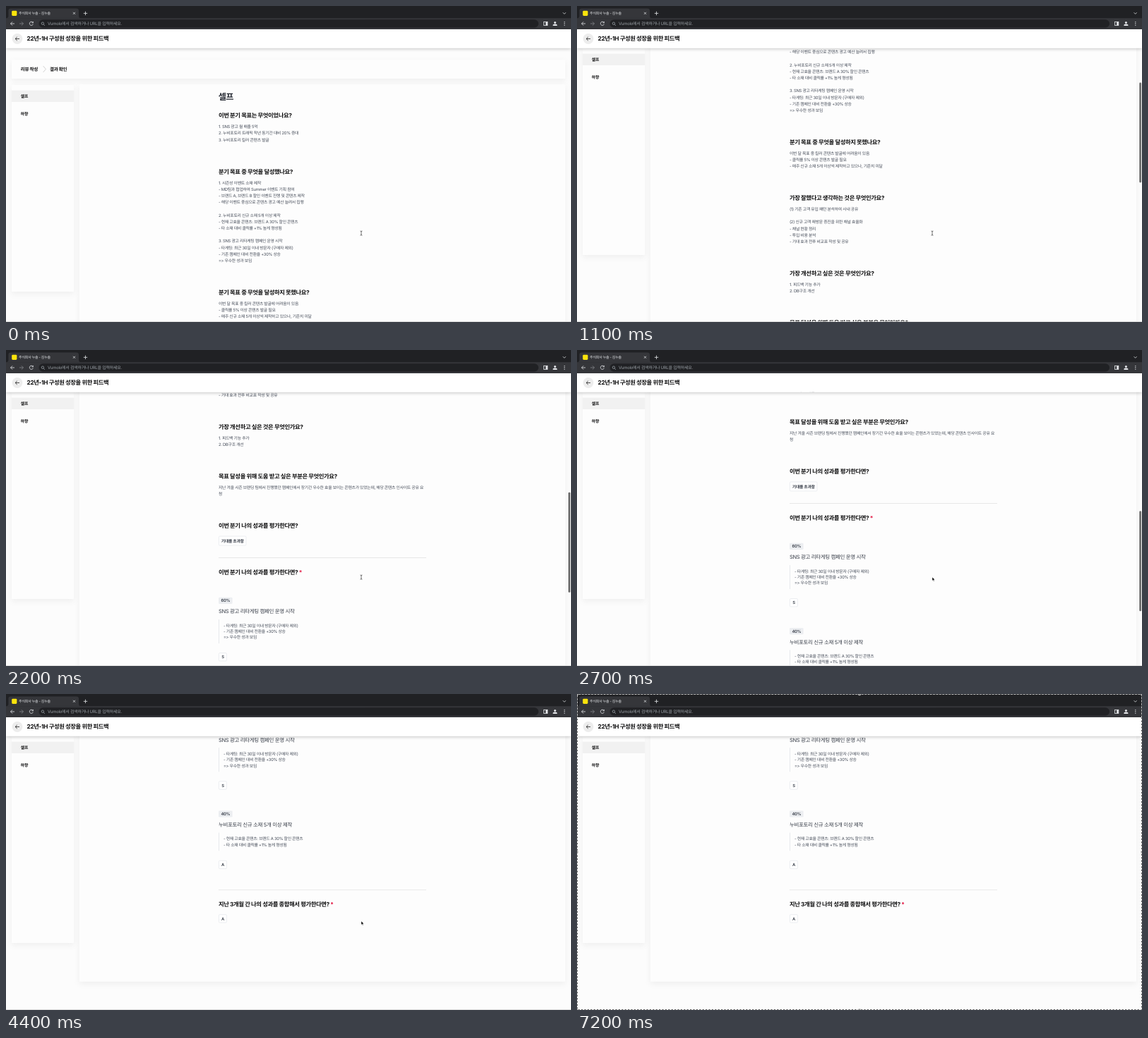
Write an HTML page that moves like this. It is 800 px wide and 448 px high and loops after 7300 ms.

```html
<!DOCTYPE html>
<html lang="ko">
<head>
<meta charset="utf-8">
<title>피드백</title>
<style>
  html, body { margin: 0; width: 100%; height: 100%; overflow: hidden; background: #fcfcfc; }
  svg { display: block; width: 100vw; height: 100vh; }
  text {
    font-family: Inter, "Noto Sans CJK KR", "Noto Sans CJK", sans-serif;
    letter-spacing: -.045em;
    text-rendering: geometricPrecision;
    white-space: pre;
  }
</style>
</head>
<body>
<svg id="stage" viewBox="0 0 800 448" lang="ko">
  <defs>
    <filter id="soft" x="-20%" y="-20%" width="140%" height="150%">
      <feDropShadow dx="0" dy="3" stdDeviation="4" flood-color="#000" flood-opacity=".055"/>
    </filter>
    <filter id="bar" x="-5%" y="-20%" width="110%" height="180%">
      <feDropShadow dx="0" dy="1.5" stdDeviation="2.2" flood-color="#000" flood-opacity=".2"/>
    </filter>
  </defs>
  <rect width="800" height="448" fill="#fcfcfc"/>
  <g id="page">
    <rect x="8" y="76" width="784" height="27" rx="1.5" fill="#fdfdfd" filter="url(#soft)"/>
    <path d="M52.6 85l3.8 4.5-3.8 4.5" fill="none" stroke="#b5b5b5" stroke-width=".6"/>
    <rect x="104" y="111" width="688" height="1086" rx="1.5" fill="#fdfdfd" filter="url(#soft)"/>
    <g id="content"></g>
    <g id="side">
      <rect x="8" y="112" width="88" height="293" rx="1.5" fill="#fdfdfd" filter="url(#soft)"/>
      <rect x="8" y="119.6" width="88" height="16.4" fill="#f1f1f1"/>
    </g>
  </g>
  <rect y="447" width="800" height="1" fill="#d8d8d8"/>
  <rect id="thumb" x="796.2" width="2.9" height="142" rx="1.4" fill="#6f6f6f"/>

  <rect y="33" width="800" height="26.6" fill="#fff" filter="url(#bar)"/>
  <circle cx="16" cy="46.5" r="7.4" fill="#ededed"/>
  <path d="M19 46.5h-5.8m2.6-2.6l-2.7 2.6 2.7 2.6" fill="none" stroke="#222" stroke-width=".8"/>

  <g id="chrome">
    <rect width="800" height="18" fill="#202124"/>
    <rect y="17.2" width="800" height="15.8" fill="#35363a"/>
    <path d="M0 17.5q3.4 0 3.4-3.4V6.6q0-3.2 3.2-3.2h93q3.4 0 3.4 3.2v7.5q0 3.4 3.4 3.4z" fill="#35363a"/>
    <rect x="8.2" y="6.8" width="7.2" height="7.2" rx="1.4" fill="#fbe40c"/>
    <rect x="46.5" y="19.2" width="707.5" height="11.6" rx="5.8" fill="#202124"/>
    <g fill="none" stroke="#e4e6e9" stroke-width=".8">
      <path d="M95 8.8l3 3m0-3l-3 3M109.8 10.4h5.4m-2.7-2.7v5.4M788.6 9.3l2 2 2-2"/>
      <path d="M12 25H6.5m2.6-2.6L6.5 25l2.6 2.6"/>
      <path d="M19 25h5.5m-2.6-2.6l2.6 2.6-2.6 2.6" stroke="#85878b"/>
      <path d="M38 23.3a2.6 2.6 0 1 0 .4 2.3M38.4 22v1.9h-1.9"/>
      <path d="M53.2 26.1l1.8 1.8" stroke="#9aa0a6"/>
      <circle cx="51.9" cy="24.7" r="1.7" stroke="#9aa0a6"/>
      <rect x="761.6" y="22.5" width="5.2" height="5"/>
    </g>
    <g fill="#e4e6e9">
      <rect x="764.2" y="22.5" width="2.6" height="5"/>
      <circle cx="777.4" cy="23.5" r="1.5"/>
      <path d="M774.4 28v-.8q0-1.7 3-1.7t3 1.7v.8z"/>
      <circle cx="790.8" cy="22.7" r=".65"/>
      <circle cx="790.8" cy="25" r=".65"/>
      <circle cx="790.8" cy="27.3" r=".65"/>
    </g>
  </g>

  <g id="cursor">
    <path id="beam" d="M-1.4-3q1.4 0 1.4 1 0-1 1.4-1M0-2.2v4.6M-1.4 3.2q1.4 0 1.4-1 0 1 1.4 1" fill="none" stroke="#222" stroke-width=".65"/>
    <path id="arrow" d="M0 0v5.2l1.2-1.1.8 1.9.9-.4-.8-1.8h1.7z" fill="#000" stroke="#fff" stroke-width=".45"/>
  </g>

  <g id="frame">
    <rect x=".5" y=".5" width="799" height="447" fill="none" stroke="#fff" stroke-opacity=".75"/>
    <rect x=".5" y=".5" width="799" height="447" fill="none" stroke="#5c5c5c" stroke-dasharray="2.4 2"/>
  </g>
</svg>
<script>
const NS = "http://www.w3.org/2000/svg";
const $ = id => document.getElementById(id);
const LEFT = 301, BODY = 5.83, STEP = 9.17;
const INK = "#434a57", DARK = "#353b46", BLACK = "#0c0c0d";

function add(parent, tag, attrs, str) {
  const el = document.createElementNS(NS, tag);
  for (const k in attrs) el.setAttribute(k, attrs[k]);
  if (str) el.textContent = str;
  parent.appendChild(el);
  return el;
}

// y is the optical middle of the line
function label(parent, str, x, y, size, weight, fill, anchor = "start") {
  return add(parent, "text", {
    x, y: y + size * .365, "font-size": size + "px", "font-weight": weight, fill, "text-anchor": anchor
  }, str);
}

const content = $("content"), page = $("page"), side = $("side");

function heading(str, y, required) {
  const el = label(content, str, LEFT, y, 8.3, 700, BLACK);
  if (required) add(el, "tspan", { fill: "#e3143f" }, " *");
}

function lines(list, y, step = STEP, x = LEFT) {
  list.forEach((s, i) => s && label(content, s, x, y + i * step, BODY, 400, INK));
}

function question(title, y, list) {
  heading(title, y);
  lines(list, y + 15.8);
}

function chip(str, y, w, h = 11.4) {
  add(content, "rect", {
    x: LEFT + .4, y: y - h / 2, width: w, height: h, rx: 1.4,
    fill: "#fff", stroke: "#dfe2e7", "stroke-width": .6
  });
  label(content, str, LEFT + .4 + w / 2, y, BODY, 600, DARK, "middle");
}

function rule(y) {
  add(content, "rect", { x: LEFT, y: y - .3, width: 294, height: .7, fill: "#dedede" });
}

function goal(percent, title, y, list, grade, gradeY) {
  add(content, "rect", { x: LEFT, y: y - 4.6, width: 19.6, height: 9.2, rx: 1.4, fill: "#eceef1" });
  label(content, percent, LEFT + 9.8, y, BODY, 600, DARK, "middle");
  label(content, title, LEFT, y + 15.2, 7.45, 400, DARK);
  add(content, "rect", { x: LEFT, y: y + 26.6, width: .8, height: 17.4 + 8.35 * (list.length - 1), fill: "#e1e4e8" });
  lines(list, y + 35.2, 8.35, LEFT + 7);
  chip(grade, gradeY, 11);
}

label(page, "리뷰 작성", 20.8, 89.5, 6.6, 700, BLACK);
label(page, "결과 확인", 62, 89.5, 6.6, 700, BLACK);
label(side, "셀프", 20.8, 128, BODY, 700, BLACK);
label(side, "하향", 20.8, 153, BODY, 700, BLACK);
label($("stage"), "22년-1H 구성원 성장을 위한 피드백", 29.6, 46.3, 8.3, 700, BLACK);
label($("chrome"), "주식회사 누솔 - 김누솔", 18, 10.4, 5, 400, "#e8eaed");
label($("chrome"), "Vumolo에서 검색하거나 URL을 입력하세요.", 59, 25.1, 6, 400, "#9aa0a6");

label(content, "셀프", LEFT - .3, 128.4, 12.2, 600, "#2a2e37");
question("이번 분기 목표는 무엇이었나요?", 155.4, [
  "1. SNS 광고 월 매출 5억",
  "2. 누비포토리 트래픽 작년 동기간 대비 20% 증대",
  "3. 누비포토리 킬러 콘텐츠 발굴"
]);
question("분기 목표 중 무엇을 달성했나요?", 235, [
  "1. 시즌성 이벤트 소재 제작",
  "- MD팀과 협업하여 Summer 이벤트 기획 참여",
  "- 브랜드 A, 브랜드 B 할인 이벤트 진행 및 콘텐츠 제작",
  "- 해당 이벤트 중심으로 콘텐츠 광고 예산 늘려서 집행",
  "",
  "2. 누비포토리 신규 소재 5개 이상 제작",
  "- 현재 고효율 콘텐츠: 브랜드 A 30% 할인 콘텐츠",
  "- 타 소재 대비 클릭률 +1% 높게 형성됨",
  "",
  "3. SNS 광고 리타게팅 캠페인 운영 시작",
  "- 타게팅: 최근 30일 이내 방문자 (구매자 제외)",
  "- 기존 캠페인 대비 전환율 +30% 상승",
  "=> 우수한 성과 보임"
]);
question("분기 목표 중 무엇을 달성하지 못했나요?", 406, [
  "이번 달 목표 중 킬러 콘텐츠 발굴에 어려움이 있음",
  "- 클릭률 5% 이상 콘텐츠 발굴 필요",
  "- 매주 신규 소재 5개 이상씩 제작하고 있으나, 기준치 미달"
]);
question("가장 잘했다고 생각하는 것은 무엇인가요?", 485.2, [
  "(1) 기존 고객 유입 패턴 분석하여 사내 공유",
  "",
  "(2) 신규 고객 재방문 증진을 위한 채널 효율화",
  "- 채널 현황 정리",
  "- 투입 비용 분석",
  "- 기대 효과 전후 비교표 작성 및 공유"
]);
question("가장 개선하고 싶은 것은 무엇인가요?", 592.3, [
  "1. 피드백 기능 추가",
  "2. DB구조 개선"
]);
question("목표 달성을 위해 도움 받고 싶은 부분은 무엇인가요?", 662.2, [
  "지난 겨울 시즌 브랜딩 팀에서 진행했던 캠페인에서 장기간 우수한 효율 보이는 콘텐츠가 있었는데, 해당 콘텐츠 인사이트 공유 요",
  "청"
]);
heading("이번 분기 나의 성과를 평가한다면?", 732.6);
chip("기대를 초과함", 754, 38.6, 13);
rule(778);
heading("이번 분기 나의 성과를 평가한다면?", 798, true);
goal("60%", "SNS 광고 리타게팅 캠페인 운영 시작", 838.8, [
  "- 타게팅: 최근 30일 이내 방문자 (구매자 제외)",
  "- 기존 캠페인 대비 전환율 +30% 상승",
  "=> 우수한 성과 보임"
], "S", 918.7);
goal("40%", "누비포토리 신규 소재 5개 이상 제작", 959.2, [
  "- 현재 고효율 콘텐츠: 브랜드 A 30% 할인 콘텐츠",
  "- 타 소재 대비 클릭률 +1% 높게 형성됨"
], "A", 1031.2);
rule(1067);
heading("지난 3개월 간 나의 성과를 종합해서 평가한다면?", 1087, true);
chip("A", 1107.6, 11);

for (const x of [0, 400, 800])
  for (const y of [0, 224, 448])
    if (x !== 400 || y !== 224)
      add($("frame"), "circle", { cx: x, cy: y, r: 1.9, fill: "#8a8a8a", stroke: "#fff", "stroke-width": .5 });

// scroll stops as [ms, px], joined by a monotone curve
const stops = [[100, 0], [1100, 213], [1800, 417], [2700, 560.5], [3600, 773.7], [4100, 789.2]];
const slope = i => (stops[i + 1][1] - stops[i][1]) / (stops[i + 1][0] - stops[i][0]);
function tangent(i) {
  if (i === 0 || i === stops.length - 1) return 0;
  const a = slope(i - 1), b = slope(i);
  return 2 * a * b / (a + b);
}

function scrollAt(t) {
  const last = stops.length - 1;
  if (t <= stops[0][0]) return 0;
  if (t >= stops[last][0]) return stops[last][1];
  let i = 0;
  while (t >= stops[i + 1][0]) i++;
  const [t0, y0] = stops[i], [t1, y1] = stops[i + 1];
  const d = t1 - t0, u = (t - t0) / d, u2 = u * u, u3 = u2 * u;
  return y0 + (y1 - y0) * (3 * u2 - 2 * u3)
    + d * (tangent(i) * (u3 - 2 * u2 + u) + tangent(i + 1) * (u3 - u2));
}

const clamp = v => Math.max(0, Math.min(1, v));
const LOOP = 7300, TICK = 100;

function draw(ms) {
  const t = Math.floor(ms % LOOP / TICK) * TICK;
  const s = scrollAt(t);
  page.setAttribute("transform", `translate(0 ${-s})`);
  side.setAttribute("transform", `translate(0 ${Math.max(0, s - 52)})`);

  $("thumb").setAttribute("y", 35 + s * .345);
  $("thumb").setAttribute("opacity", t < 200 ? 0 : clamp((4400 - t) / 300));

  const drift = clamp((t - 4800) / 400), ease = drift * drift * (3 - 2 * drift);
  $("cursor").setAttribute("transform", `translate(${503 - 5 * ease} ${322 + 104 * ease})`);
  $("cursor").setAttribute("opacity", t < 6000 ? 1 : 0);
  $("beam").setAttribute("opacity", s < 490 ? 1 : 0);
  $("arrow").setAttribute("opacity", s < 490 ? 0 : 1);

  $("frame").setAttribute("opacity", clamp((t - 5900) / 200));
}

const start = performance.now();
function loop() {
  draw(performance.now() - start);
  requestAnimationFrame(loop);
}
draw(0);
requestAnimationFrame(loop);
</script>
</body>
</html>
```
